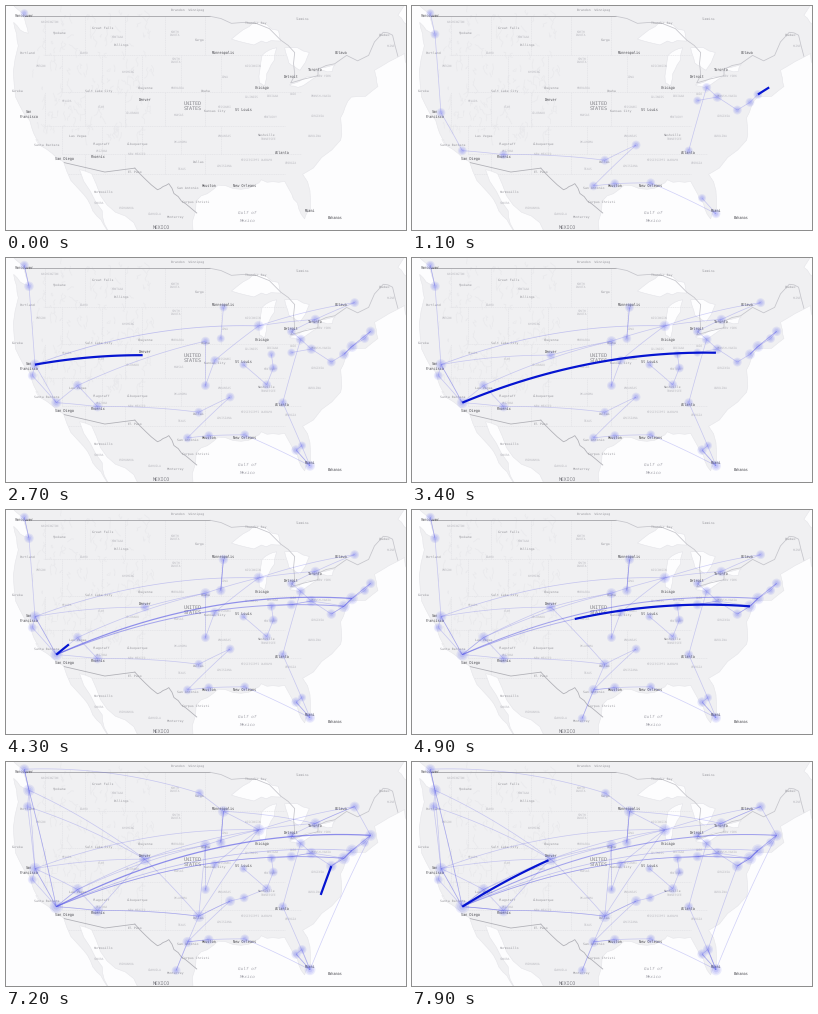
A matplotlib script for the animation above (8 s loop, 400 by 224 pixels).

```python
import numpy as np
import matplotlib.pyplot as plt
from matplotlib.animation import FuncAnimation
from matplotlib.collections import LineCollection

W, H, DPI = 400, 224, 100
FRAMES, STEP = 80, 100
PX = 72 / DPI
LAND, WATER = "#f0f0f2", "#fdfdfe"
HEAD, TRAIL = (0.02, 0.08, 0.82), (0.33, 0.33, 0.9)

plt.rcParams["font.family"] = "DejaVu Sans Mono"
plt.rcParams["text.hinting"] = "none"
rng = np.random.default_rng(4)

fig = plt.figure(figsize=(W / DPI, H / DPI), dpi=DPI, facecolor=WATER)
ax = fig.add_axes([0, 0, 1, 1])
ax.set_xlim(0, W)
ax.set_ylim(H, 0)
ax.axis("off")


def project(lonlat):
    """Web Mercator, longitude and latitude to stage pixels."""
    lon, lat = np.asarray(lonlat, float).T
    merc = np.log(np.tan(np.pi / 4 + np.radians(lat) / 2))
    return np.column_stack([304 + 6.66 * (lon + 80.2), 208 - 381.6 * (merc - 0.4657)])


def roughen(points, rounds=2, size=0.06):
    """Split every edge in two and nudge the midpoint sideways."""
    p = np.asarray(points, float)
    for _ in range(rounds):
        step = np.diff(p, axis=0)
        mid = p[:-1] + step / 2 + step[:, ::-1] * [-1, 1] * rng.normal(0, size, (len(step), 1))
        p = np.insert(p, np.arange(1, len(p)), mid, axis=0)
    return p


def great_circle(a, b, part=1.0):
    """Great circle from a to b, drawn up to the given share."""
    lon, lat = np.radians([a, b]).T
    p, q = np.column_stack([np.cos(lat) * np.cos(lon), np.cos(lat) * np.sin(lon), np.sin(lat)])
    angle = np.arccos(p @ q)
    u = np.linspace(0, part, 30)[:, None]
    v = np.sin((1 - u) * angle) * p + np.sin(u * angle) * q
    lon, lat = np.arctan2(v[:, 1], v[:, 0]), np.arctan2(v[:, 2], np.hypot(v[:, 0], v[:, 1]))
    return project(np.degrees(np.column_stack([lon, lat])))


# ---- base map -------------------------------------------------------------
COAST = [(-128, 53), (-123.2, 49.2), (-122.5, 47.3), (-124.7, 48.4), (-124, 46), (-124.4, 40.4),
         (-121.9, 36.6), (-120.6, 34.6), (-117.2, 32.6), (-114.2, 28.4), (-112.2, 25.5),
         (-110.2, 23), (-111.4, 26.2), (-114.8, 31.6), (-113, 31.1), (-109.4, 26), (-105, 22),
         (-97.7, 22), (-97.3, 27.5), (-94, 29.6), (-89.4, 29.2), (-87.5, 30.3), (-84, 30.1),
         (-82.7, 27.8), (-81, 25.1), (-80.1, 26.5), (-81.3, 31), (-75.6, 35.3), (-75.6, 38),
         (-74, 40.4), (-70, 41.6), (-70.5, 43.4), (-66, 45.2), (-65.5, 43.6), (-60, 46),
         (-65, 47.9), (-67, 49.1), (-60, 53)]
LAKES = [[(-92, 46.7), (-88.5, 48.5), (-85, 47.6), (-84.6, 46.5), (-87.5, 46.5)],
         [(-87.8, 42), (-87.4, 45), (-85.2, 45.8), (-86.4, 43.4), (-87, 41.7)],
         [(-84, 45.8), (-80.3, 45.3), (-81.7, 43.4), (-83.4, 44.2)],
         [(-83.3, 41.8), (-80.6, 42.7), (-79, 42.8), (-82, 41.5)],
         [(-79.7, 43.3), (-76.4, 44), (-76.8, 43.3)]]
NORTH = [(-123, 49), (-95.2, 49), (-92, 48.3), (-88.3, 48.3), (-84.6, 46.6), (-82.5, 45.3),
         (-82.5, 43), (-83.1, 42), (-79, 42.8), (-79, 43.5), (-76.5, 44.1), (-74.7, 45),
         (-71.4, 45), (-69.2, 47.4), (-67.8, 47.1), (-67, 44.9)]
SOUTH = [(-117.1, 32.5), (-111, 31.3), (-106.5, 31.8), (-103.1, 29), (-101.4, 29.8),
         (-99.5, 27.5), (-97.2, 25.9)]

land = ax.add_patch(plt.Polygon(project(roughen(COAST)), fc=LAND, ec="#e5e5e9", lw=0.4, zorder=0))
for lake in LAKES:
    shore = project(roughen(lake + lake[:1]))
    ax.add_patch(plt.Polygon(shore, fc=WATER, ec="#e3e3e8", lw=0.4, zorder=1.5))


def stroke(points, color, width, **kw):
    ax.plot(*project(points).T, color=color, lw=width * PX, zorder=2, **kw)


# state lines: staggered blocks between a few parallels
rows = [31, 33.6, 37, 41, 45, 49]
for k, (south, north) in enumerate(zip(rows, rows[1:])):
    cols = np.arange(-120 + 2.5 * (k % 2), -78, 6)
    faint = dict(color="#e1e1e5", width=0.6, ls=(0, (2, 1)), clip_path=land)
    stroke([(cols[0], south), (cols[-1], south)], **faint)
    for lon in cols[:-2]:
        stroke([(lon, south), (lon, north)], **faint)
stroke(NORTH[:2], "#a8a8ad", 0.9)
stroke(roughen(NORTH[1:], 1), "#c6c6cc", 0.8)
stroke(SOUTH[:3], "#b0b0b6", 0.8)
stroke(roughen(SOUTH[2:]), "#b0b0b6", 0.8)

# faint mountain relief
start = rng.uniform((28, 2), (145, 130), (150, 2))
bends = rng.normal((0, 1.6), (1.4, 1.5), (150, 5, 2))
relief = start[:, None] + np.cumsum(bends, axis=1)
ax.add_collection(LineCollection(relief, colors="#e9e9ec", linewidths=0.7 * PX, zorder=1))

# ---- places: longitude and latitude ---------------------------------------
CITY = dict(
    VAN=(-123.1, 49.3), SEA=(-122.4, 47.2), POR=(-122.6, 45.5), SAC=(-121.5, 38.6),
    SJ=(-121.9, 37.3), LA=(-118.3, 34), LV=(-115.1, 36.1), PHX=(-112.1, 33.5), DEN=(-105, 39.7),
    FAR=(-96.8, 46.9), MSP=(-93.2, 45), DSM=(-93.6, 41.6), OMA=(-95.9, 41.3), KC=(-94.5, 39.1),
    STL=(-90.2, 38.6), MIL=(-87.9, 43), DET=(-83, 42.4), CLE=(-81.6, 41.5), TOR=(-79.4, 43.7),
    MTL=(-73.5, 45.5), BOS=(-71.1, 42.4), PVD=(-72, 41.6), NYC=(-73.9, 40.7), PHI=(-75.1, 39.8),
    DC=(-77, 38.9), PIT=(-80, 40.4), COL=(-83, 40), IND=(-86, 39.8), LOU=(-85.7, 38.2),
    NSH=(-86.7, 36.2), ATL=(-84.3, 34), TUL=(-95.9, 36.1), DAL=(-96.9, 32.8), LIT=(-92.2, 34.7),
    MEM=(-90.1, 35.1), HOU=(-95.4, 29.8), SAT=(-98.6, 29.5), MTY=(-100.3, 25.7),
    NOL=(-90, 29.9), TPA=(-82.3, 27.9), ORL=(-81.4, 28.5), MIA=(-80.2, 25.8))
ABOVE = dict(MSP="Minneapolis", DEN="Denver", STL="St Louis", DET="Detroit", MIA="Miami")
BELOW = dict(VAN="Vancouver", TOR="Toronto", PHX="Phoenix", HOU="Houston", NOL="New Orleans",
             ATL="Atlanta")
MINOR = dict(POR="Portland", LV="Las Vegas", DAL="Dallas", OMA="Omaha", KC="Kansas City",
             SAT="San Antonio", MTY="Monterrey", FAR="Fargo", NSH="Nashville")
BIG_SPOTS = [(256, 81, "Chicago"), (335, 48, "Ottawa"), (23, 107, "San"), (23, 111, "Francisco"),
             (58, 152, "San Diego"), (329, 212, "Bahamas")]
SMALL_SPOTS = [(54, 27, "Spokane"), (97, 22, "Great Falls"), (116, 39, "Billings"), (12, 85, "Eureka"),
               (93, 85, "Salt Lake City"), (140, 82, "Cheyenne"), (41, 139, "Santa Barbara"),
               (95, 138, "Flagstaff"), (132, 138, "Albuquerque"), (129, 166, "El Paso"),
               (190, 196, "Corpus Christi"), (98, 186, "Hermosillo"), (297, 13, "Timmins"),
               (250, 17, "Thunder Bay"), (379, 29, "Quebec"), (182, 4, "Brandon  Winnipeg")]
# region names spread evenly between two points
REGIONS = [((44, 16), (35, 60), "WASHINGTON,OREGON"), ((78, 47), (61, 95), "IDAHO,NEVADA"),
           ((112, 31), (385, 40), "MONTANA,MAINE"), ((122, 66), (131, 148), "WYOMING,COLORADO,NEW MEXICO"),
           ((95, 101), (96, 145), "UTAH,ARIZONA"),
           ((169, 28), (176, 163), "NORTH\nDAKOTA,SOUTH\nDAKOTA,NEBRASKA,KANSAS,OKLAHOMA,TEXAS"),
           ((219, 71), (219, 160), "IOWA,MISSOURI,ARKANSAS,LOUISIANA"),
           ((247, 60), (244, 154), "WISCONSIN,ILLINOIS,,MISSISSIPPI"),
           ((267, 90), (261, 154), "INDIANA,KENTUCKY,TENNESSEE,ALABAMA"),
           ((287, 88), (285, 157), "OHIO,GEORGIA"),
           ((318, 70), (309, 130), "NEW YORK,PENNSYLVANIA,VIRGINIA,CAROLINA"),
           ((93, 197), (149, 208), "SONORA,CHIHUAHUA,COAHUILA")]


def label(x, y, name, size, color, **kw):
    ax.text(x, y, name, size=size * PX, color=color, ha="center", va="center",
            linespacing=1.1, zorder=3, **kw)


codes = list(CITY)
spots = project(list(CITY.values()))
spot = dict(zip(codes, spots))
BIG, SMALL = (3.5, "#4c4c52"), (3.3, "#96969c")
for names, dy, look in [(ABOVE, -3, BIG), (BELOW, 2.5, BIG), (MINOR, 2, SMALL)]:
    for code, name in names.items():
        label(spot[code][0], spot[code][1] + dy, name, *look)
for rows_, look in [(BIG_SPOTS, BIG), (SMALL_SPOTS, SMALL)]:
    for row in rows_:
        label(*row, *look)
for first, last, text in REGIONS:
    names = text.split(",")
    for (x, y), name in zip(np.linspace(first, last, len(names)), names):
        label(x, y, name, 2.9, "#bcbcc2")
label(187, 100, "UNITED\nSTATES", 5, "#85858b")
label(155, 222, "MEXICO", 4.8, "#7c7c82")
label(241, 207, "Gulf of", 4.4, "#a4a4ac", style="italic")
label(241, 215, "Mexico", 4.4, "#a4a4ac", style="italic")

# ---- journeys: each tour runs from the previous end to its own end in ms ----
TOURS = [
    (900, "VAN SEA SAC LA PHX DAL LIT SAT HOU NOL MIA TPA|ATL CLE PIT COL|PIT DC"),
    (1800, "DC PHI NYC PVD BOS|MIL MTL TOR MIL SAC SJ LA|MIA ATL|TOR DET CLE"),
    (2090, "OMA TUL KC MIL|MSP DSM|STL NSH LOU IND|LV OMA|LA LV PHX|PHI NYC BOS"),
    (3110, "SEA VAN|BOS NYC PHI|MIA TPA ORL|SAC DEN OMA MIL|SAC LA|MSP DSM"),
    (3437, "LA PHI"),
    (3750, "PHI PIT COL IND|MSP DSM"),
    (4080, "LA NYC"),
    (4240, "NYC PHI DC"),
    (4340, "LA LV"),
    (4700, "LV DEN DAL MTY SAT HOU"),
    (5040, "PHI LA"),
    (5780, "LA PHX DAL LIT MEM|DAL OMA|SAC POR SEA VAN|POR DEN|SEA LA|LV SAC|MEM NSH"),
    (6300, "VAN FAR MSP MIL|LA SEA|DEN PHX|DEN MIL"),
    (7160, "DEN SEA|MSP TOR MTL BOS MIA ORL|DAL MIL|LA BOS|NYC DC"),
    (7280, "DC ORL"),
    (7580, "ORL MIA|DC PHI NYC|PHX LA"),
    (7908, "LA DEN"),
]


def make_legs():
    legs, t0 = [], 0
    for t1, text in TOURS:
        chains = [chain.split() for chain in text.split("|")]
        hops = [hop for stops in chains for hop in zip(stops, stops[1:])]
        times = np.linspace(t0, t1, len(hops) + 1)
        legs += [(a, b, s, e) for (a, b), s, e in zip(hops, times, times[1:])]
        t0 = t1
    return legs


LEGS = make_legs()
trails = LineCollection([], zorder=4)
heads = LineCollection([], colors=[HEAD], linewidths=2.2 * PX, zorder=6)
ax.add_collection(trails)
ax.add_collection(heads)
GLOW = [(1.0, 0.11), (0.75, 0.11), (0.45, 0.14)]
halos = [ax.scatter(*spots.T, s=0, color="#5058f0", alpha=a, lw=0, zorder=5) for _, a in GLOW]


def draw(i):
    t = i * STEP
    visits = dict.fromkeys(codes, 0)
    lines, colors, widths, active = [], [], [], []
    for a, b, t0, t1 in LEGS:
        if t < t0:
            break
        visits[a] += 0.5
        if t < t1:
            if t > t0:
                active.append(great_circle(CITY[a], CITY[b], (t - t0) / (t1 - t0)))
            continue
        visits[b] += 0.5
        # long flights stay bright for a while
        length = np.hypot(*(spot[a] - spot[b]))
        fresh = np.clip(length / 100 - 2, 0, 1) * np.exp((t1 - t) / 1500)
        lines.append(great_circle(CITY[a], CITY[b]))
        colors.append(TRAIL + (0.27 + 0.4 * fresh,))
        widths.append((0.7 + 0.6 * fresh) * PX)
    trails.set_segments(lines)
    trails.set_color(colors)
    trails.set_linewidths(widths or [1])
    heads.set_segments(active)
    count = np.array(list(visits.values()))
    radius = np.where(count > 0, np.minimum(3 + 1.4 * np.sqrt(count), 7), 0)
    for halo, (share, _) in zip(halos, GLOW):
        halo.set_sizes((2 * radius * share * PX) ** 2)
    return [trails, heads, *halos]


anim = FuncAnimation(fig, draw, frames=FRAMES, interval=STEP, repeat=True, repeat_delay=0)
plt.show()
```
